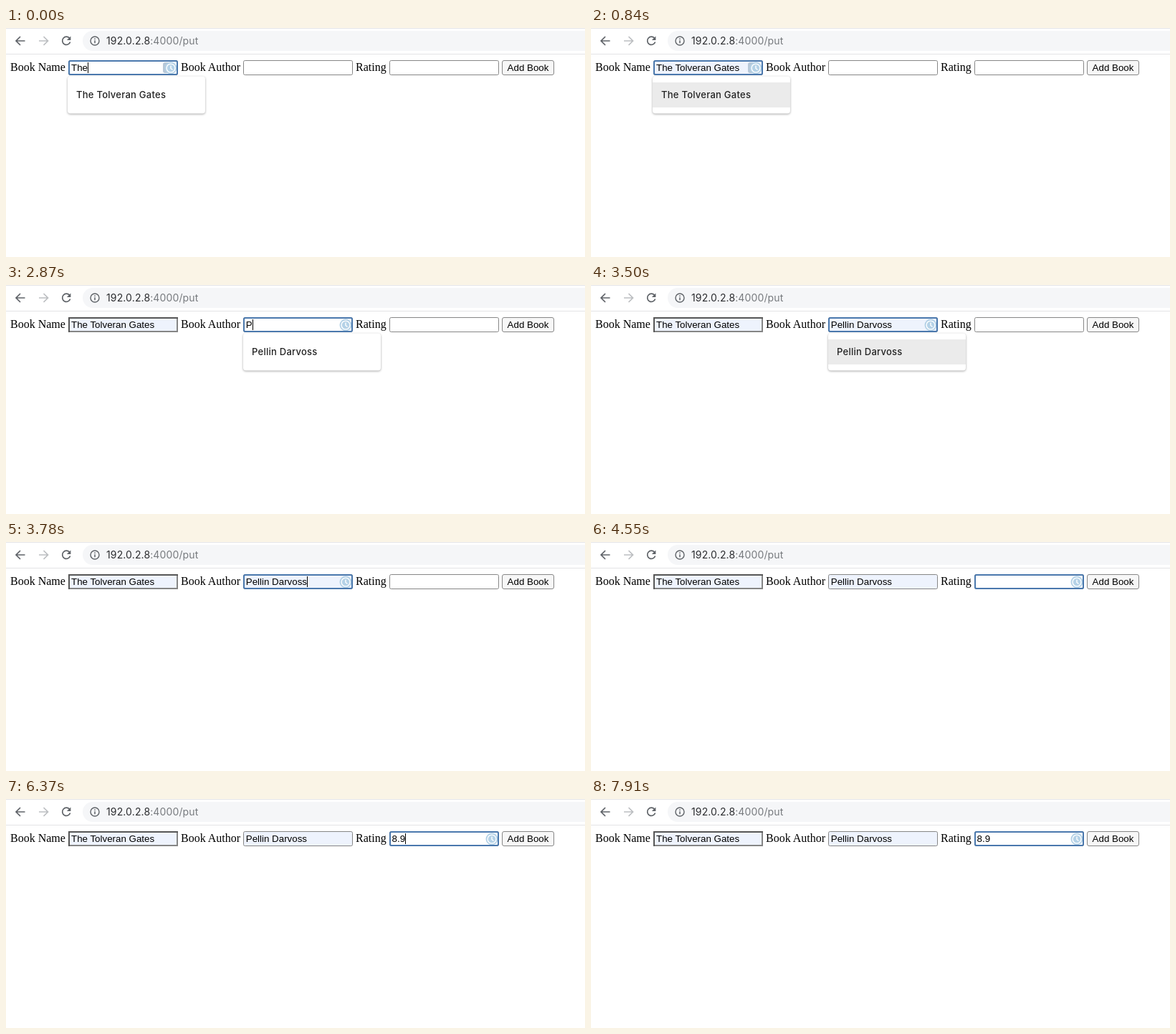
An HTML page that plays this animation: 808 px wide and 320 px high, repeating every 8000 ms.

```html
<!DOCTYPE html>
<html lang="en">
<head>
<meta charset="utf-8">
<title>Add a book</title>
<style>
  html, body { margin: 0; width: 100%; height: 100%; overflow: hidden; background: #fff; }
  svg { display: block; width: 808px; height: 320px; }
  text { white-space: pre; font-kerning: none; }
  .label { font: 16px "Liberation Serif", Times, serif; }
  .value { font: 13.333px "Liberation Sans", Arial, sans-serif; }
  .hint { font: 500 13px Inter, Roboto, sans-serif; letter-spacing: .25px; fill: #222; }
  .url { font: 14px Inter, Roboto, sans-serif; letter-spacing: .13px; fill: #2b2c2f; }
  .line { fill: none; stroke-width: 1.7; }
  .pop { filter: drop-shadow(0 1px 1.5px rgba(0, 0, 0, .35)); }
</style>
</head>
<body>
<svg id="stage" viewBox="0 0 808 320" xmlns="http://www.w3.org/2000/svg">
  <rect width="808" height="320" fill="#fff"/>
  <rect width="808" height="1" fill="#e4e5e7"/>
  <rect y="36" width="808" height="1" fill="#e3e4e6"/>
  <rect x="107" y="4" width="730" height="28" rx="14" fill="#f5f6f8"/>
  <path class="line" stroke="#5f6368" d="M26.5 18H14.5M20 12l-6 6 6 6"/>
  <path class="line" stroke="#bcbec1" d="M46 18H58M52.5 12l6 6-6 6"/>
  <path class="line" stroke="#5f6368" d="M88.6 14.2A5.6 5.6 0 1 0 89.6 19.5"/>
  <path fill="#5f6368" d="M90.4 11.5V17H84.9Z"/>
  <circle cx="124" cy="18" r="6" fill="none" stroke="#5f6368" stroke-width="1.4"/>
  <path stroke="#5f6368" stroke-width="1.5" d="M124 17.3V21.3M124 14.6V16.1"/>
  <text class="url" x="140" y="23">192.0.2.8<tspan fill="#777a7e">:4000/put</tspan></text>
  <text class="label" x="6" y="60">Book Name</text>
  <text class="label" x="244" y="60">Book Author</text>
  <text class="label" x="488" y="60">Rating</text>
  <rect x="692.5" y="45.5" width="72" height="20" rx="2.5" fill="#f7f7f7" stroke="#868686"/>
  <text class="value" x="699.6" y="60">Add Book</text>
</svg>
<script>
const LOOP = 8000;
const FILL = '#eef3fd';
const stage = document.getElementById('stage');
const BOOK = 'The Tolveran Gates', AUTHOR = 'Pellin Darvoss', RATING = '8.9';

function add(parent, tag, attrs, text) {
  const node = document.createElementNS('http://www.w3.org/2000/svg', tag);
  for (const key in attrs) node.setAttribute(key, attrs[key]);
  if (text) node.textContent = text;
  parent.appendChild(node);
  return node;
}

const show = (node, on) => node.setAttribute('visibility', on ? 'visible' : 'hidden');

function makeField(x, textX, hint, first) {
  const box = add(stage, 'rect', { x: x + .5, y: 45.5, width: 152, height: 20, rx: 2, stroke: '#868686' });
  const inset = add(stage, 'g', { fill: 'none', 'stroke-width': 2 });
  add(inset, 'path', { d: `M${x + 152} 46V65H${x}`, stroke: '#858585' });
  add(inset, 'path', { d: `M${x + 1} 66V46H${x + 153}`, stroke: '#565656' });

  const icon = add(stage, 'g', {});
  const cx = x + 143;
  if (first) add(icon, 'rect', { x: x + 132, y: 48, width: 15, height: 15, rx: 3, fill: '#b7c8d8' });
  add(icon, 'circle', { cx, cy: 56, r: 8.5, fill: '#b5d2e7' });
  const hand = { fill: 'none', stroke: '#fff', 'stroke-width': 1.4 };
  add(icon, 'circle', { cx, cy: 56, r: 5.9, ...hand });
  add(icon, 'path', { d: `M${cx} 52.5V56.5L${cx + 2.5} 58.5`, ...hand });

  // the focus ring lies inside the edge of the box
  const ring = add(stage, 'rect', { x: x + 1, y: 46, width: 151, height: 19, rx: 2, fill: 'none', stroke: '#4a78ad', 'stroke-width': 2 });
  const value = add(stage, 'text', { class: 'value', x: textX, y: 60 });
  const caret = add(stage, 'rect', { y: 48, width: 1, height: 15 });

  const left = first ? x - 1 : x;
  const pop = add(stage, 'g', { class: 'pop' });
  add(pop, 'rect', { x: left, y: 67.5, width: 192, height: 52, rx: 4, fill: '#fff' });
  const row = add(pop, 'rect', { x: left, y: 76, width: 192, height: 35, fill: '#ebebeb' });
  add(pop, 'text', { class: 'hint', x: left + 12, y: 98 }, hint);
  return { box, inset, icon, ring, value, caret, pop, row, textX, first };
}

const fields = [
  makeField(87, 91, BOOK, true),
  makeField(331, 334.8, AUTHOR),
  makeField(535, 538.6, RATING)
];
const fullText = [BOOK, AUTHOR, RATING];

// time, focused field, its text, caret, list (0 none, 1 open, 2 row chosen), filled in
const steps = [
  [0, 0, 'The', 1, 1, 0],
  [420, 0, 'The', 0, 1, 0],
  [840, 0, BOOK, 0, 2, 1],
  [1330, 1, '', 1, 0, 0],
  [1890, 1, '', 0, 0, 0],
  [2380, 1, '', 1, 0, 0],
  [2870, 1, 'P', 1, 1, 0],
  [3360, 1, 'P', 0, 1, 0],
  [3500, 1, AUTHOR, 0, 2, 1],
  [3780, 1, AUTHOR, 1, 0, 1],
  [4060, 2, '', 1, 0, 0],
  [4550, 2, '', 0, 0, 0],
  [5110, 2, '', 1, 0, 0],
  [5460, 2, '8', 1, 0, 0],
  [5530, 2, '8', 1, 1, 0],
  [6020, 2, '8.', 1, 1, 0],
  [6300, 2, RATING, 1, 1, 0],
  [6370, 2, RATING, 1, 0, 0],
  [6860, 2, RATING, 0, 0, 0],
  [7420, 2, RATING, 1, 0, 0],
  [7910, 2, RATING, 0, 0, 0]
];
const focusAt = [-1000, 1330, 4060];

function draw(time) {
  const [, active, text, blink, list, filled] = steps.findLast(s => s[0] <= time);
  fields.forEach((f, i) => {
    const on = i === active, done = i < active;
    const content = on ? text : done ? fullText[i] : '';
    if (f.value.textContent !== content) f.value.textContent = content;
    f.box.setAttribute('fill', done || (on && filled) ? FILL : '#fff');
    show(f.inset, f.first && done);
    show(f.ring, on);
    show(f.icon, on);
    // the icon fades in over five 70 ms steps
    const fade = Math.floor((time - focusAt[i]) / 70) / 4;
    f.icon.setAttribute('opacity', Math.max(0, Math.min(1, fade)));
    show(f.caret, on && blink);
    if (on && blink) {
      const width = content ? f.value.getComputedTextLength() : 0;
      f.caret.setAttribute('x', Math.round(f.textX + width));
    }
    show(f.pop, on && list);
    show(f.row, on && list === 2);
  });
}

const start = performance.now();
function tick(now) {
  draw(Math.max(0, now - start) % LOOP);
  requestAnimationFrame(tick);
}
draw(0);
requestAnimationFrame(tick);
</script>
</body>
</html>
```
